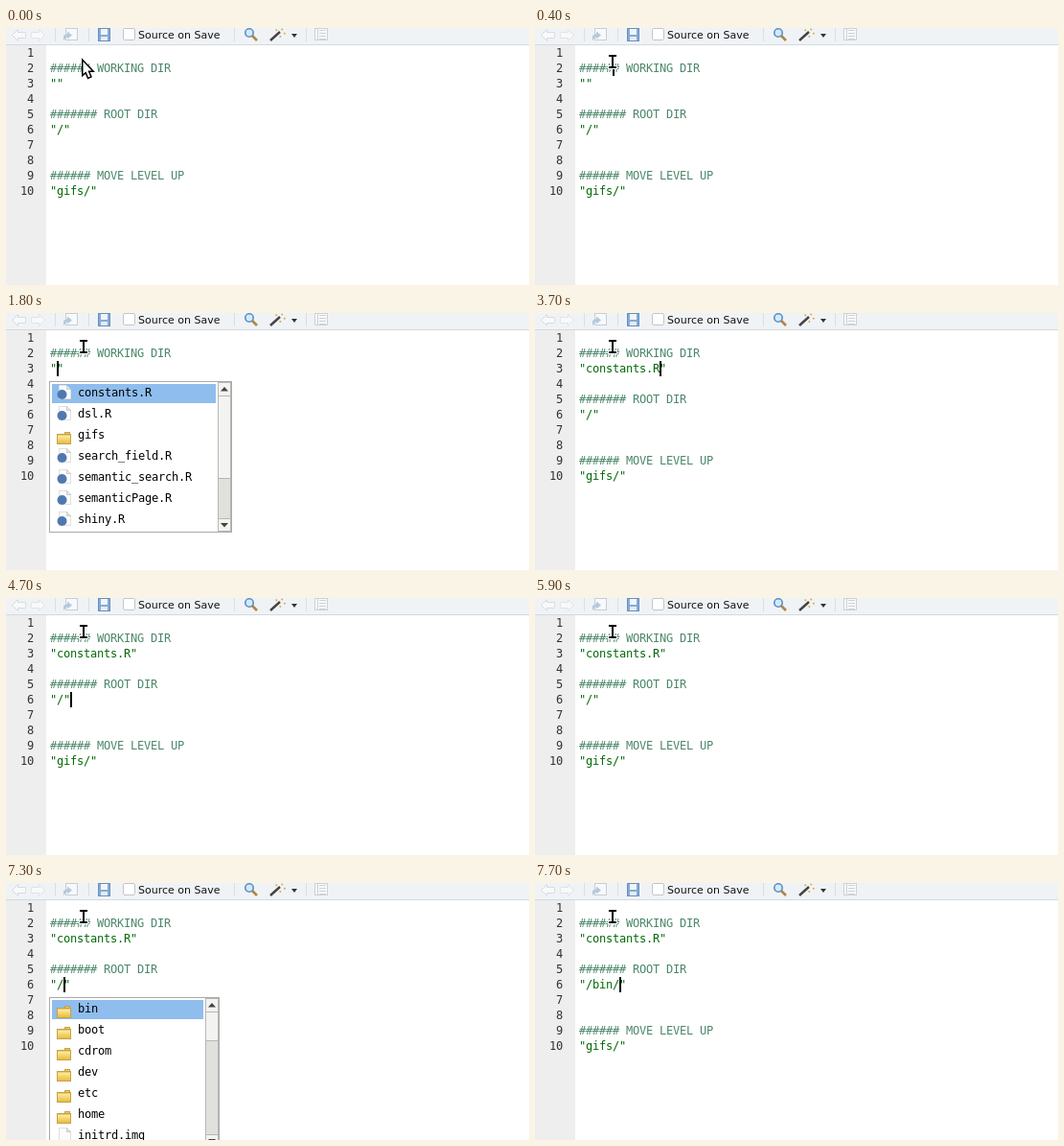
Animation of 546 by 268 pixels, one loop 8 s. Source, as an HTML page with a canvas:

```html
<!DOCTYPE html>
<html lang="en">
<head>
<meta charset="utf-8">
<title>Path completion</title>
<style>
html, body { margin: 0; width: 546px; height: 268px; overflow: hidden; background: #fff; }
canvas { display: block; }
</style>
</head>
<body>
<canvas id="stage" width="546" height="268"></canvas>
<script>
const ctx = document.getElementById('stage').getContext('2d');
const LOOP = 8000, CELL = 7, LEFT = 46, LINE = 16, TOP = 18, ROW = 22;
const COMMENT = '#4c886b', STRING = '#036a07';

const text = ['', '###### WORKING DIR', '""', '', '####### ROOT DIR', '"/"',
  '', '', '###### MOVE LEVEL UP', '"gifs/"'];

const keys = [
  { at: 1200, key: 'down' },
  { at: 1400, key: 'left' },
  { at: 3700, insert: 'constants.R' },
  { at: 4200, key: 'down' },
  { at: 4400, key: 'down' },
  { at: 4700, key: 'down' },
  { at: 5400, key: 'left' },
  { at: 7700, insert: 'bin/' }
];

const menus = [
  { from: 1800, to: 3700, row: 2, width: 191, thumb: 87,
    items: ['constants.R', 'dsl.R', 'gifs', 'search_field.R', 'semantic_search.R', 'semanticPage.R', 'shiny.R'] },
  { from: 6100, to: 7700, row: 5, width: 178, thumb: 31,
    items: ['bin', 'boot', 'cdrom', 'dev', 'etc', 'home', 'initrd.img'] }
];

// Replays the keys up to t; vertical moves remember the wanted column
function replay(t) {
  const lines = [...text];
  let row = 1, col = 5, want = 5, last = 400;
  for (const { at, key, insert } of keys) {
    if (at > t) break;
    last = at;
    if (key === 'down') {
      row++;
      col = Math.min(want, lines[row].length);
      continue;
    }
    if (key === 'left') col--;
    if (insert) {
      lines[row] = lines[row].slice(0, col) + insert + lines[row].slice(col);
      col += insert.length;
    }
    want = col;
  }
  const phase = (t - last) % 1000;
  const blink = t >= 5300 && phase >= 500 && phase < 900;
  return { lines, row, col, caret: t >= 400 && !blink };
}

function rect(x, y, w, h, color) {
  ctx.fillStyle = color;
  ctx.fillRect(x, y, w, h);
}

function frame(x, y, w, h, fill, edge) {
  rect(x, y, w, h, edge);
  rect(x + 1, y + 1, w - 2, h - 2, fill);
}

function path(d, fill, stroke, width = 1) {
  const p = new Path2D(d);
  if (stroke) {
    ctx.strokeStyle = stroke;
    ctx.lineWidth = width;
    ctx.stroke(p);
  }
  if (fill) {
    ctx.fillStyle = fill;
    ctx.fill(p);
  }
}

function circle(x, y, r, fill, stroke, width) {
  ctx.beginPath();
  ctx.arc(x, y, r, 0, Math.PI * 2);
  ctx.fillStyle = fill;
  ctx.fill();
  if (!stroke) return;
  ctx.strokeStyle = stroke;
  ctx.lineWidth = width;
  ctx.stroke();
}

function triangle(x, y, h, color) {
  path(`M${x - 4} ${y}h8l-4 ${h}z`, color);
}

// Monospaced text on the editor's cell grid
function mono(s, x, y, color) {
  ctx.font = '12px "DejaVu Sans Mono", monospace';
  ctx.fillStyle = color;
  [...s].forEach((c, i) => ctx.fillText(c, x + i * CELL, y));
}

function navArrow(x, dir, edge) {
  path(`M${x} 7.5l${dir * 6} -5.5v3h${dir * 8}v5h${dir * -8}v3z`, '#f8f9fa', edge);
}

function toolbar() {
  rect(0, 0, 546, 17, '#f0f3f6');
  rect(0, 17, 546, 1, '#d3d9de');
  for (const x of [51, 86, 238, 313]) rect(x, 0, 1, 14, '#dadee1');

  navArrow(6.5, 1, '#bfc3c6');
  navArrow(40.5, -1, '#cfd3d6');

  frame(62, 0, 13, 13, '#f7f9fa', '#c6ced5');
  path('M60 13v-5l4 -2v-2.5l5 4l-5 4v-2.5z', '#b4c9dd');

  frame(96, 0, 13, 14, '#86abd4', '#6690c0');
  rect(99, 1, 7, 6, '#f1f5fa');
  rect(99, 9, 7, 4, '#e3ebf4');

  path('M125 .5h7q2.5 0 2.5 2.5v7q0 2.5 -2.5 2.5h-7q-2.5 0 -2.5 -2.5v-7q0 -2.5 2.5 -2.5z', '#fff', '#8b8b8b');
  ctx.font = '11px "DejaVu Sans", sans-serif';
  ctx.fillStyle = '#111';
  ctx.fillText('Source on Save', 138, 11);

  path('M257 8l5 5', null, '#b5853f', 2.6);
  circle(254, 5, 4.2, '#d5e9f8', '#5b8fc4', 1.6);

  path('M276 13l10 -9', null, '#444', 2.4);
  for (let i = 0; i < 4; i++) {
    const a = i * 1.3 - 2.4;
    circle(286 + 5 * Math.cos(a), 5 + 4 * Math.sin(a), 1, '#e3a548');
  }
  path('M298 6h6l-3 4z', '#333');

  frame(322, 0, 14, 13, '#fafbfc', '#cdd1d5');
  rect(325, 0, 1, 13, '#cdd1d5');
  for (let y = 2; y < 12; y += 3) rect(327, y, 7, 1, '#cdd1d5');
}

function editor({ lines, row, col, caret }) {
  rect(0, TOP, 42, 250, '#eeeeee');
  lines.forEach((s, i) => {
    const base = TOP + i * LINE + 12, n = String(i + 1);
    mono(n, 29 - n.length * CELL, base, '#333');
    mono(s, LEFT, base, s[0] === '#' ? COMMENT : STRING);
  });
  if (caret) rect(LEFT + col * CELL, TOP + row * LINE, 2, LINE, '#000');
}

function page(x, y) {
  path(`M${x} ${y}h8l4 4v10h-12z`, '#fcfcfc', '#c5c5c5');
  path(`M${x + 8} ${y}v4h4z`, '#e6e6e6', '#b9b9b9');
}

function folder(x, y) {
  frame(x + 8, y, 6, 5, '#eccb68', '#c5a04a');
  frame(x, y + 2, 15, 11, '#eccb68', '#c5a04a');
  const shine = ctx.createLinearGradient(0, y + 3, 0, y + 12);
  shine.addColorStop(0, '#fff0a8');
  shine.addColorStop(1, '#e8bd3c');
  rect(x + 1, y + 4, 13, 8, shine);
}

function icon(name, y) {
  if (!name.includes('.')) return folder(53, y + 6);
  page(55.5, y + 1.5);
  if (name.endsWith('.R')) circle(58.5, y + 11, 5, '#4f78ae');
}

function scrollbar(x, y, thumb) {
  const part = (top, h) => frame(x, y + top, 14, h, '#f3f3f1', '#b8b7b3');
  frame(x, y, 14, 156, '#e0e0dd', '#b8b7b3');
  part(0, 15);
  part(14, thumb);
  part(142, 14);
  triangle(x + 7, y + 9.5, -4.5, '#444');
  triangle(x + 7, y + 147, 4.5, '#444');
}

function menu({ row, width, thumb, items }) {
  const y = TOP + (row + 1) * LINE + 5;
  frame(45, y, width, 158, '#fff', '#aaaaaa');
  rect(48, y + 3, width - 20, 20, '#8fbdee');
  items.forEach((name, i) => {
    const top = y + 3 + i * ROW;
    icon(name, top);
    mono(name, 75, top + 13, '#000');
  });
  scrollbar(30 + width, y + 1, thumb);
}

function arrow() {
  path('M80.5 35v13l3 -2.5l2.5 6l2 -1l-2.5 -6h4z', '#fff', '#000', 3);
}

function ibeam() {
  for (const [pad, color] of [[1, '#fff'], [0, '#000']]) {
    const part = (x, y, w, h) => rect(x - pad, y - pad, w + 2 * pad, h + 2 * pad, color);
    part(77, 28, 8, 2);
    part(80, 28, 2, 13);
    part(77, 40, 8, 2);
  }
}

function draw(t) {
  rect(0, 0, 546, 268, '#fff');
  toolbar();
  editor(replay(t));
  for (const m of menus) if (t >= m.from && t < m.to) menu(m);
  if (t < 400) arrow();
  else ibeam();
}

const start = performance.now();
function tick() {
  draw((performance.now() - start) % LOOP);
  requestAnimationFrame(tick);
}
tick();
</script>
</body>
</html>
```
